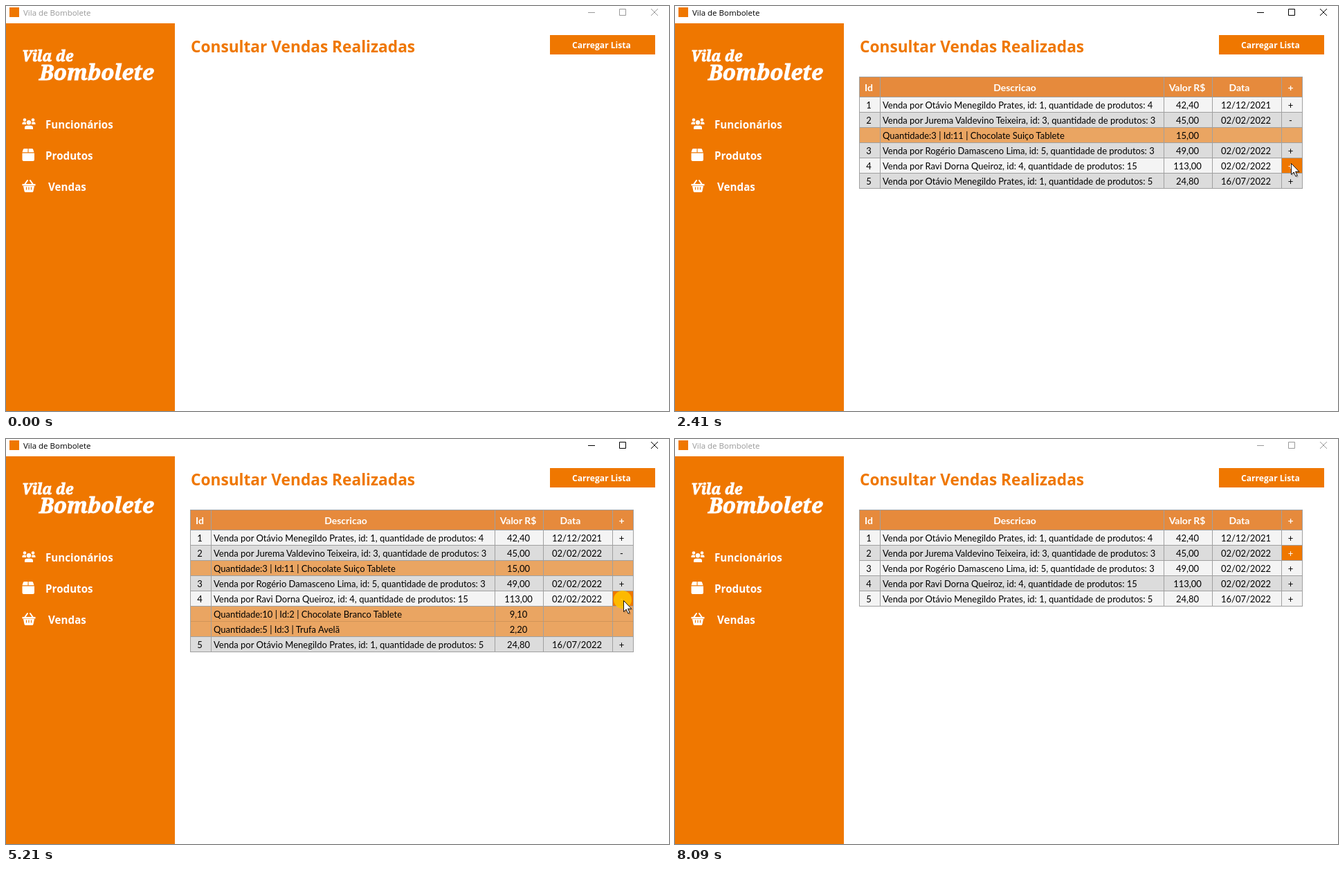
These frames come from a looping animation (958x585 px, 8.16 s). An HTML page:

```html
<!DOCTYPE html>
<html lang="pt">
<head>
<meta charset="utf-8">
<title>Vila de Bombolete</title>
<style>
  html, body { margin: 0; width: 100%; height: 100%; overflow: hidden; background: #fff; }
  svg { display: block; width: 958px; height: 585px; }
  .ui { font-family: "Open Sans", sans-serif; font-weight: 700; }
  .logo { font-family: "Noto Serif", serif; font-weight: 900; font-style: italic; fill: #fff; stroke: #fff; stroke-width: .9; }
  #table { font: 13px Lato, sans-serif; }
  #table .head { font-size: 14px; font-weight: 700; fill: #fff; }
  .mid { text-anchor: middle; }
  rect { shape-rendering: crispEdges; }
</style>
</head>
<body>
<svg viewBox="0 0 958 585">
  <rect width="958" height="585" fill="#fff"/>
  <rect x="5" y="2" width="14" height="14" fill="#ef7700"/>
  <g id="bar">
    <text class="ui" x="25" y="14" font-size="11.5" style="font-weight:400">Vila de Bombolete</text>
    <rect x="841" y="9" width="10" height="1"/>
    <path d="M886.5 4.5h9v9h-9z" fill="none" stroke="currentColor"/>
    <path d="M932 4l10 10m0-10l-10 10" fill="none" stroke="currentColor"/>
  </g>

  <rect y="25" width="244" height="560" fill="#ef7700"/>
  <text class="logo" x="23" y="80" font-size="21">Vila de</text>
  <text class="logo" x="48" y="107" font-size="31">Bombolete</text>
  <g fill="#fff">
    <g id="people">
      <circle cx="27" cy="164.5" r="2.3"/><circle cx="39" cy="164.5" r="2.3"/>
      <circle cx="33" cy="168.3" r="3.2"/>
      <path d="M23.5 171v-1.4q0-2 2-2h2q1 0 1.4.6-.4 1.8.4 2.800zM42.500 171v-1.400q0-2-2-2h-2q-1 0-1.400.6.4 1.800-.4 2.800z"/>
      <path d="M27 178v-2q0-3.300 3.400-3.300h5.200q3.400 0 3.400 3.300v2z"/>
    </g>
    <path id="box" d="M26.500 206h5v5.300h-8l1.300-4q.5-1.300 1.700-1.300zM32.600 206h4.900q1.200 0 1.700 1.300l1.300 4h-7.900zM23.500 212.400h17.500v9.500q0 2-2 2h-13.500q-2 0-2-2z"/>
    <g id="basket">
      <path d="M23.500 257h19v2.500h-19zM25 260h16l-1.500 7.500q-.4 1.500-2 1.500h-9q-1.600 0-2-1.500z"/>
      <path d="M27.500 257l3.500-5M38.500 257l-3.500-5" stroke="#fff" stroke-width="2" stroke-linecap="round"/>
      <path d="M29.500 261.500v4M33 261.500v4M36.500 261.500v4" stroke="#ef7700" stroke-width="1.2"/>
    </g>
    <g class="ui" font-size="15.2">
      <text x="57" y="177">Funcionários</text>
      <text x="57" y="222">Produtos</text>
      <text x="61" y="267">Vendas</text>
    </g>
  </g>

  <text class="ui" x="267" y="67" font-size="22.7" fill="#ef7700">Consultar Vendas Realizadas</text>
  <rect id="button" fill="#ef7700"/>
  <text class="ui mid" x="860.5" y="61" font-size="12.1" fill="#fff">Carregar Lista</text>

  <g id="table"></g>
  <circle id="press" r="13" fill="#ffc400" fill-opacity=".85"/>
  <g id="cursor">
    <path d="M1.5 2v17l4-4 2.5 6 3-1-2.5-6h5.5z" fill="#000" opacity=".18"/>
    <path d="M.5.5v16l3.7-3.5 2.6 6 2.4-1-2.6-5.8h5.2z" fill="#fff" stroke="#000" stroke-width=".9"/>
  </g>
</svg>

<script>
const LOOP = 8160, LOADED = 830;
const EDGES = [266, 296, 706, 776, 876, 906];
const CENTERS = [280, 0, 740.5, 825, 889.5];
const HEAD_CENTERS = [280, 491, 740, 815.5, 889.5];

const sale = (id, seller, count, price, date, items = []) => ({
  id, price, date, items,
  text: `Venda por ${seller}, quantidade de produtos: ${count}`
});
const item = (count, id, name, price) => ({ text: `Quantidade:${count} | Id:${id} | ${name}`, price, sub: true });
const white = ['Chocolate Branco Tablete', '9,10'], truffle = ['Trufa Avelã', '2,20'];
const SALES = [
  sale(1, 'Otávio Menegildo Prates, id: 1', 4, '42,40', '12/12/2021'),
  sale(2, 'Jurema Valdevino Teixeira, id: 3', 3, '45,00', '02/02/2022', [item(3, 11, 'Chocolate Suiço Tablete', '15,00')]),
  sale(3, 'Rogério Damasceno Lima, id: 5', 3, '49,00', '02/02/2022'),
  sale(4, 'Ravi Dorna Queiroz, id: 4', 15, '113,00', '02/02/2022', [item(10, 2, ...white), item(5, 3, ...truffle)]),
  sale(5, 'Otávio Menegildo Prates, id: 1', 5, '24,80', '16/07/2022', [item(3, 3, ...truffle), item(2, 2, ...white)])
];

// Each click: press, cell selection, release, row toggle
const CLICKS = [
  { down: 620, up: 760 },
  { row: 2, down: 1400, select: 1400, up: 1530, toggle: 1600 },
  { row: 4, down: 2335, select: 2335, up: 2405, toggle: 2475 },
  { row: 5, down: 3075, select: 3145, up: 3215, toggle: 3285 },
  { row: 5, down: 4255, select: 4255, up: 4325, toggle: 4395 },
  { row: 4, down: 5065, select: 5135, up: 5275, toggle: 5345 },
  { row: 2, down: 6635, select: 6705, up: 6845, toggle: 6915 }
];

// Pointer path: time, x, y
const PATH = [
  [70, 892, 529], [280, 880, 300], [490, 863, 78], [580, 860, 58], [800, 858, 58],
  [900, 856, 68], [1040, 853, 109], [1200, 872, 148], [1350, 888, 170], [1760, 888, 170],
  [2010, 890, 227], [2500, 890, 227], [2880, 891, 293], [3300, 891, 293], [3510, 891, 298],
  [3650, 891, 298], [3800, 888, 322], [3920, 891, 303], [4060, 891, 299], [4400, 891, 299],
  [4880, 892, 233], [5750, 892, 233], [6290, 890, 149], [6570, 892, 169], [7060, 892, 169],
  [7330, 906, 108], [7470, 901, 190], [7820, 880, 546]
];

const $ = id => document.getElementById(id);
const rect = (x, y, w, h, fill) => `<rect x="${x}" y="${y}" width="${w}" height="${h}" fill="${fill}"/>`;
const label = (text, x, y, cls, fill = '#000') => `<text class="${cls}" x="${x}" y="${y}" fill="${fill}">${text}</text>`;

function drawTable(open, selected) {
  const rows = SALES.flatMap(s => open.has(s.id) ? [s, ...s.items] : [s]);
  let out = rect(266, 102, 641, 30 + rows.length * 22, '#a0a0a0');
  const cells = (y, h, color) => EDGES.slice(0, 5).forEach((x, c) => {
    out += rect(x + 1, y, EDGES[c + 1] - x - 1, h, color(c));
  });
  cells(103, 28, () => '#e68a3c');
  ['Id', 'Descricao', 'Valor R$', 'Data', '+'].forEach((name, c) => {
    out += label(name, HEAD_CENTERS[c], 123, 'head mid', '#fff');
  });
  rows.forEach((row, i) => {
    const y = 132 + i * 22;
    const hot = c => !row.sub && selected === row.id + ':' + c;
    const base = row.sub ? '#eaa562' : i % 2 ? '#dcdcdc' : '#f4f4f4';
    cells(y, 21, c => hot(c) ? '#ef7700' : base);
    if (row.sub && rows[i + 1]?.sub) out += rect(267, y + 21, 639, 1, '#d1955a');
    const values = [row.id, row.text, row.price, row.date, row.sub ? '' : open.has(row.id) ? '-' : '+'];
    values.forEach((value, c) => {
      if (value) out += label(value, c === 1 ? 300 : CENTERS[c], y + 16, c === 1 ? '' : 'mid', hot(c) ? '#fff' : '#000');
    });
  });
  $('table').innerHTML = out;
}

function pointerAt(t) {
  const i = Math.max(1, PATH.findIndex(p => p[0] >= t));
  const [a, b] = [PATH[i - 1], PATH[i]];
  const k = Math.min(1, Math.max(0, (t - a[0]) / (b[0] - a[0])));
  return [1, 2].map(n => Math.round(a[n] + (b[n] - a[n]) * k));
}

let lastState;
function render(t) {
  const open = new Set();
  let selected = '1:0';
  for (const c of CLICKS) {
    if (t >= c.select) selected = c.row + ':4';
    if (t >= c.toggle) open.has(c.row) ? open.delete(c.row) : open.add(c.row);
  }
  const state = t < LOADED ? '' : selected + [...open];
  if (state !== lastState) {
    if (state) drawTable(open, selected);
    else $('table').innerHTML = '';
    lastState = state;
  }

  const active = t >= 620 && t < 8085;
  $('bar').style.fill = $('bar').style.color = active ? '#000' : '#999';
  const inset = t >= 500 && t < 1100 ? 1 : 0;
  const box = { x: 786 + inset, y: 42 + inset, width: 152 - 2 * inset, height: 28 - 2 * inset };
  for (const key in box) $('button').setAttribute(key, box[key]);

  const visible = t >= 68 && t < 7885;
  $('cursor').style.display = visible ? '' : 'none';
  $('press').style.display = CLICKS.some(c => t >= c.down && t < c.up) ? '' : 'none';
  if (visible) {
    const [x, y] = pointerAt(Math.min(t, 7820));
    $('cursor').setAttribute('transform', `translate(${x} ${y})`);
    $('press').setAttribute('transform', `translate(${x - 1} ${y - 1})`);
  }
}

function frame() {
  render(performance.now() % LOOP);
  requestAnimationFrame(frame);
}
frame();
</script>
</body>
</html>
```
